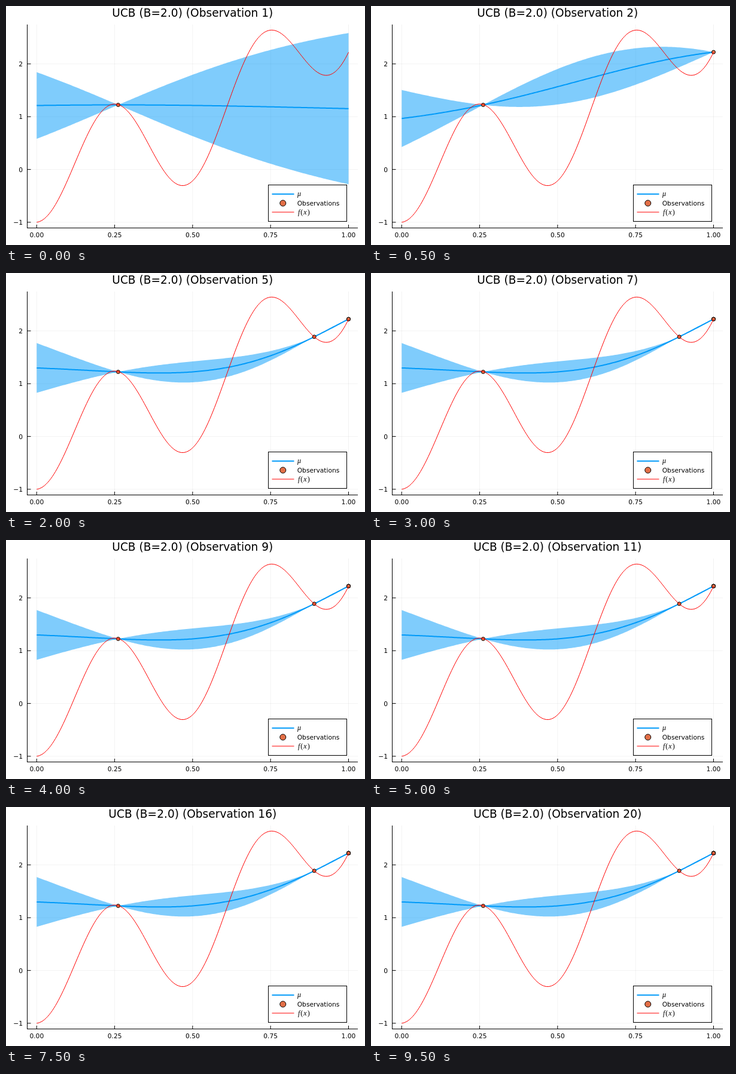
An HTML page for the animation above (10000 ms loop, 600 px wide and 400 px high).

```html
<!DOCTYPE html>
<html lang="en">
<head>
<meta charset="utf-8">
<title>Upper confidence bound search</title>
<style>
html, body { margin: 0; width: 100%; height: 100%; overflow: hidden; background: #fff; }
svg { display: block; width: 600px; height: 400px; }
text { font-family: "DejaVu Sans", sans-serif; font-size: 10.7px; font-kerning: none; fill: #000; }
#title { font-size: 18.6px; text-anchor: middle; }
.xt { text-anchor: middle; }
.yt { text-anchor: end; }
.math { font: italic 12px "Liberation Serif", serif; letter-spacing: 1px; }
.up { font-style: normal; }
.grid { stroke: #000; stroke-opacity: .05; }
.axis { stroke: #000; fill: none; }
.band { fill: #009af9; fill-opacity: .5; }
.mean { stroke: #009af9; stroke-width: 2; fill: none; stroke-linejoin: round; }
.truth { stroke: #f00; fill: none; stroke-linejoin: round; }
.dot { fill: #e36f47; stroke: #000; }
</style>
</head>
<body>
<svg viewBox="0 0 600 400">
  <g id="grid" class="grid"></g>
  <path id="band" class="band"/>
  <path id="mean" class="mean"/>
  <g id="dots"></g>
  <path id="truth" class="truth"/>
  <path class="axis" d="M35.5 31V372M35 371.5H588"/>
  <g id="ticks"></g>
  <text id="title" x="311.8" y="18"></text>
  <rect x="438.5" y="299.5" width="131" height="61" fill="#fff" stroke="#000"/>
  <path class="mean" d="M444.5 314.7H481.5"/>
  <circle class="dot" cx="462.8" cy="330" r="5"/>
  <path class="truth" d="M444.5 345H481.5"/>
  <text class="math" x="487" y="317.5">μ</text>
  <text x="486.7" y="334.3">Observations</text>
  <text class="math" x="488" y="348.7">f<tspan class="up">(</tspan>x<tspan class="up">)</tspan></text>
</svg>
<script>
const $ = id => document.getElementById(id);
const STEP = 500, COUNT = 20, N = 200;
const px = x => 51.3 + 521.2 * x;
const py = v => 273.6 - 88.35 * v;
const xs = Array.from({ length: N + 1 }, (_, i) => i / N);
const line = pts => pts.map(([x, v]) => px(x).toFixed(2) + ' ' + py(v).toFixed(2)).join('L');

// Objective: a wave on a rising trend
const f = x => -Math.cos(13 * x) + x * (.694 + .586 * x + 2.438 * x * x - .59 * x ** 3);

// Gaussian process: Matern 5/2 kernel, unit length scale, prior mean 1
const PRIOR = 1, Z = 1.96;
function kernel(p, q) {
  const a = Math.sqrt(5) * Math.abs(p - q);
  return (1 + a + a * a / 3) * Math.exp(-a);
}

function solve(A, b) {
  const n = b.length, M = A.map((row, i) => [...row, b[i]]);
  for (let i = 0; i < n; i++)
    for (let r = 0; r < n; r++) {
      if (r === i) continue;
      const k = M[r][i] / M[i][i];
      for (let c = i; c <= n; c++) M[r][c] -= k * M[i][c];
    }
  return M.map((row, i) => row[n] / row[i]);
}

function fit(obs) {
  const K = obs.map(([p]) => obs.map(([q]) => kernel(p, q)));
  const mean = [], top = [], low = [];
  for (const x of xs) {
    const k = obs.map(([p]) => kernel(x, p));
    const w = solve(K, k);
    let m = PRIOR, s = 1;
    obs.forEach(([, y], i) => { m += w[i] * (y - PRIOR); s -= w[i] * k[i]; });
    const h = Z * Math.sqrt(Math.max(0, s));
    mean.push([x, m]);
    top.push([x, m + h]);
    low.unshift([x, m - h]);
  }
  return { mean: 'M' + line(mean), band: 'M' + line(top.concat(low)) + 'Z' };
}

const samples = [[.2613, 1.2235], [1, 2.2235], [.89, 1.888]];
const models = samples.map((_, i) => fit(samples.slice(0, i + 1)));

function drawAxes() {
  let grid = '', ticks = '';
  for (let i = 0; i <= 4; i++) {
    const x = px(i / 4);
    grid += `<path d="M${x} 31V371"/>`;
    ticks += `<path class="axis" d="M${x} 371V366"/>` +
      `<text class="xt" x="${x}" y="386.7">${(i / 4).toFixed(2)}</text>`;
  }
  for (let v = -1; v <= 2; v++) {
    const y = py(v);
    grid += `<path d="M36 ${y}H588"/>`;
    ticks += `<path class="axis" d="M36 ${y}H41.5"/>` +
      `<text class="yt" x="28" y="${y + 4}">${String(v).replace('-', '−')}</text>`;
  }
  $('grid').innerHTML = grid;
  $('ticks').innerHTML = ticks;
  $('truth').setAttribute('d', 'M' + line(xs.map(x => [x, f(x)])));
}

const dot = ([x, v]) => `<circle class="dot" cx="${px(x)}" cy="${py(v)}" r="3"/>`;

function show(n) {
  const model = models[Math.min(n, models.length) - 1];
  $('band').setAttribute('d', model.band);
  $('mean').setAttribute('d', model.mean);
  $('title').textContent = `UCB (B=2.0) (Observation ${n})`;
  // Later picks all repeat the right end
  let dots = '';
  for (let i = 0; i < n; i++) dots += dot(samples[i] || samples[1]);
  $('dots').innerHTML = dots;
}

let shown = 0;
function tick() {
  const n = Math.floor(performance.now() / STEP) % COUNT + 1;
  if (n !== shown) show(shown = n);
  requestAnimationFrame(tick);
}
drawAxes();
tick();
</script>
</body>
</html>
```
